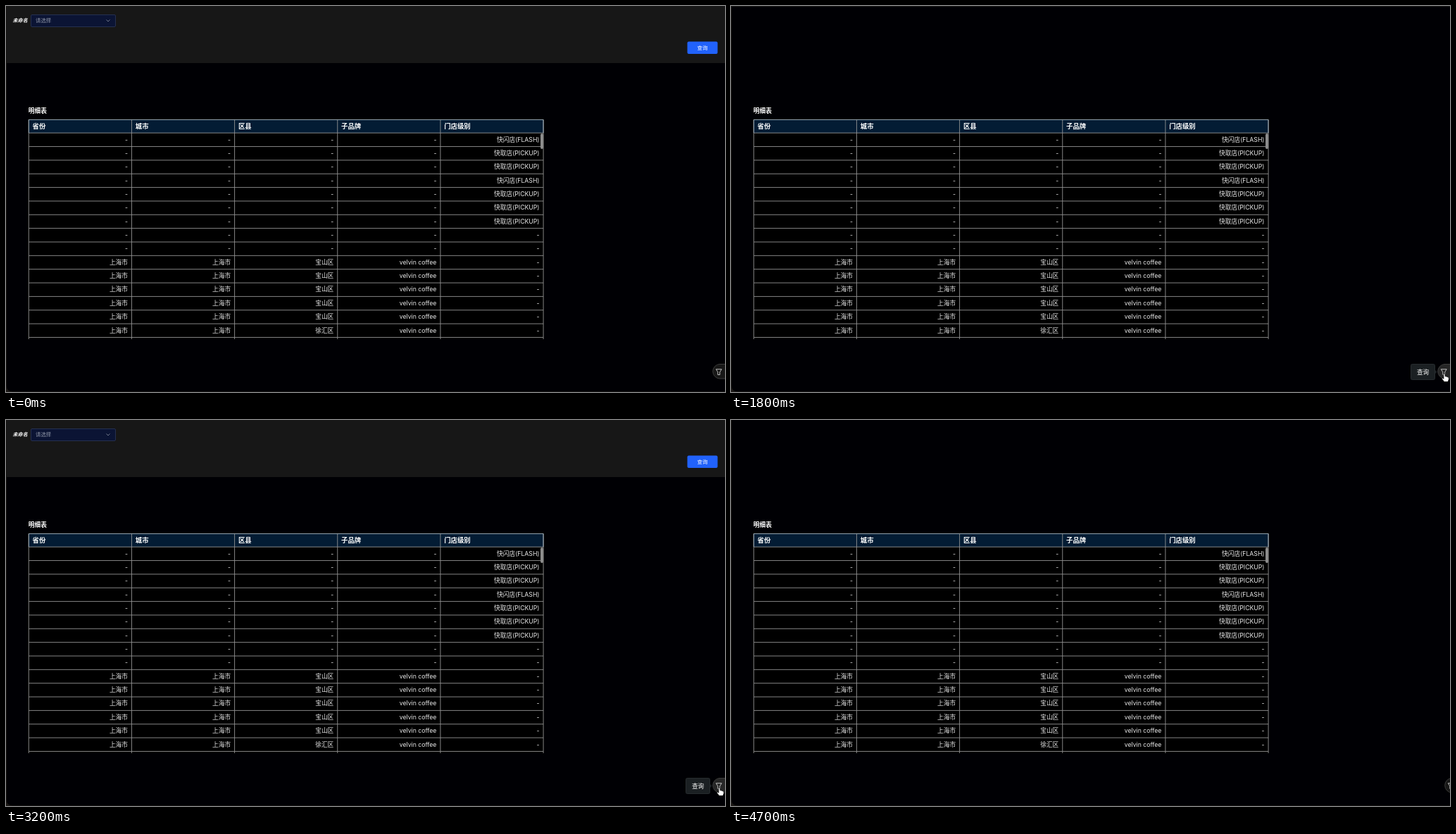
An HTML page that plays this animation: 1021x548 px, repeating every 4.9 s.

```html
<!DOCTYPE html>
<html lang="zh-CN">
<head>
<meta charset="utf-8">
<style>
  html, body { margin: 0; width: 100%; height: 100%; overflow: hidden; background: #1b1816; }
  svg { display: block; width: 1021px; height: 548px; }
  text { font-family: Inter, "Noto Sans CJK SC", "Noto Sans CJK", sans-serif; }
</style>
</head>
<body>
<svg viewBox="0 0 1021 548">
  <path d="M.8 0H1021V547.3H9Q.8 547.3 .8 539Z" fill="#000004"/>
  <g id="table"></g>
  <g id="panel">
    <rect x=".8" width="1021" height="81" fill="#171717"/>
    <rect x="35.5" y="12.5" width="120" height="17" rx="1.5" fill="#0b1434" stroke="#26304f"/>
    <path d="M142.5 19.5l2.5 2.5 2.5-2.5" fill="none" stroke="#7d8496" stroke-width=".9"/>
    <rect x="967.5" y="50.5" width="43" height="17.5" rx="2" fill="#2162fb"/>
  </g>
  <g id="filter">
    <path id="knob" d="M1024 508.5H1013A10.3 10.3 0 0 0 1013 529H1024Z" stroke="#3c3c3c"/>
    <path d="M1008.3 515.7H1016.2L1013.7 519.7V523.5H1010.8V519.7Z" fill="none" stroke="#d0d0d0" stroke-width=".9" stroke-linejoin="round"/>
  </g>
  <g id="tip">
    <path d="M999 516l3.5 3.5-3.5 3.5z" fill="#1b2023"/>
    <rect x="965.5" y="508.5" width="34" height="22" rx="2" fill="#1b2023" stroke="#272c2f"/>
  </g>
  <g id="ring" fill="none">
    <circle cx="1013" cy="522" r="19.8" stroke="#000" stroke-width="3"/>
    <circle cx="1013" cy="522" r="21.5" stroke="#eee" stroke-width="1.5"/>
    <circle cx="1013" cy="522" r="18" stroke="#ddd" stroke-width="1.3"/>
  </g>
  <g id="cursor" fill="#fff" stroke="#000" stroke-width=".8" stroke-linejoin="round">
    <path id="arrow" d="M0 0V11L2.6 8.6 4.3 12.2 6 11.4 4.4 8H8Z"/>
    <path id="hand" d="M-1.2 .8Q0-.8 1 .8L1.2 4.2Q2.4 3.4 3 4.6 4.2 4 4.7 5.2 6.2 4.8 6.3 6.4V8.6L5 11.8H-.2L-3.6 7.6Q-3.7 6-2.2 6.6L-1 7.6Z"/>
  </g>
</svg>
<script>
const $ = id => document.getElementById(id);

function add(parent, name, attrs) {
  const el = document.createElementNS('http://www.w3.org/2000/svg', name);
  for (const key in attrs) el.setAttribute(key, attrs[key]);
  return $(parent).appendChild(el);
}
// Places text by its vertical middle.
function label(parent, text, x, middle, size, attrs) {
  add(parent, 'text', { x, y: middle + size * 0.37, 'font-size': size, fill: '#fff', ...attrs })
    .textContent = text;
}

const LEFT = 32.3, TOP = 161.4, COL = 146.15, ROW = 19.35, BODY = 180.2, BOTTOM = 473;
const RIGHT = LEFT + 5 * COL;
const bold = { 'font-weight': 700 };

function rowCells(i) {
  if (i < 9) {
    const level = i > 6 ? '-' : i % 3 || i === 6 ? '快取店(PICKUP)' : '快闪店(FLASH)';
    return ['-', '-', '-', '-', level];
  }
  return ['上海市', '上海市', i < 14 ? '宝山区' : '徐汇区', 'velvin coffee', '-'];
}

function buildTable() {
  label('table', '明细表', 31.8, 148.6, 8.7, bold);
  add('table', 'rect', { x: LEFT, y: BODY, width: RIGHT - LEFT, height: BOTTOM - BODY, fill: '#000' });
  add('table', 'rect', { x: LEFT, y: TOP, width: RIGHT - LEFT, height: BODY - TOP, fill: '#031c34' });
  ['省份', '城市', '区县', '子品牌', '门店级别'].forEach((name, c) =>
    label('table', name, LEFT + c * COL + 5.3, 170.7, 9.4, bold));
  for (let i = 0; i < 15; i++) {
    rowCells(i).forEach((cell, c) => label('table', cell, LEFT + (c + 1) * COL - 5.5,
      BODY + (i + 0.5) * ROW - 0.45, 8.7, { 'text-anchor': 'end', fill: '#e8e8e8' }));
  }
  let lines = '';
  for (let i = 0; i < 16; i++) lines += `M${LEFT} ${BODY + i * ROW}H${RIGHT}`;
  for (let c = 0; c < 6; c++) lines += `M${LEFT + c * COL} ${TOP}V${BOTTOM}`;
  add('table', 'path', { d: lines, stroke: '#949494', 'stroke-width': 0.9 });
  add('table', 'path', { d: `M${LEFT} ${BODY}V${TOP}H${RIGHT}V${BODY}`, fill: 'none', stroke: '#9aa9b5' });
  add('table', 'rect', { x: 759, y: 181, width: 4, height: 22, rx: 2, fill: '#8c8c8c' });
}

buildTable();
label('panel', '未命名', 9.5, 20.5, 7.1, { ...bold, 'font-style': 'italic' });
label('panel', '请选择', 42, 20.7, 7.4, { fill: '#8f96a8' });
label('panel', '查询', 981.5, 59.3, 7.4);
label('tip', '查询', 974, 519.5, 8.6);

const LOOP = 4900, TICK = 100;
const progress = (t, from, to) => Math.min(1, Math.max(0, (t - from) / (to - from)));
const easeOut = p => 1 - (1 - p) ** 3;
const within = (t, from, to) => t >= from && t < to;
const show = (id, visible) => $(id).setAttribute('visibility', visible ? 'visible' : 'hidden');
const move = (id, x, y) => $(id).setAttribute('transform', `translate(${x} ${y})`);

function draw(now) {
  const t = Math.floor(now % LOOP / TICK) * TICK;

  const hidden = easeOut(progress(t, 1650, 1850)) - easeOut(progress(t, 2600, 2900))
    + easeOut(progress(t, 3200, 3400));
  move('panel', 0, -81 * hidden);

  const enter = easeOut(progress(t, 500, 1200));
  const leave = progress(t, 4000, 4300);
  move('cursor', 1003 + 10 * enter + 14 * leave, 552 - 30.3 * enter);
  const hover = within(t, 1000, 4300);
  show('hand', hover);
  show('arrow', within(t, 500, 1000));

  $('knob').setAttribute('fill', hover ? '#262626' : '#171717');
  move('filter', 10 * easeOut(progress(t, 4200, 4600)), 0);
  $('tip').setAttribute('opacity', progress(t, 1100, 1300) - progress(t, 4400, 4700));
  show('ring', within(t, 1500, 1700) || within(t, 2400, 2600) || within(t, 3000, 3200));
}

const start = performance.now();
function tick() {
  draw(performance.now() - start);
  requestAnimationFrame(tick);
}
tick();
</script>
</body>
</html>
```
